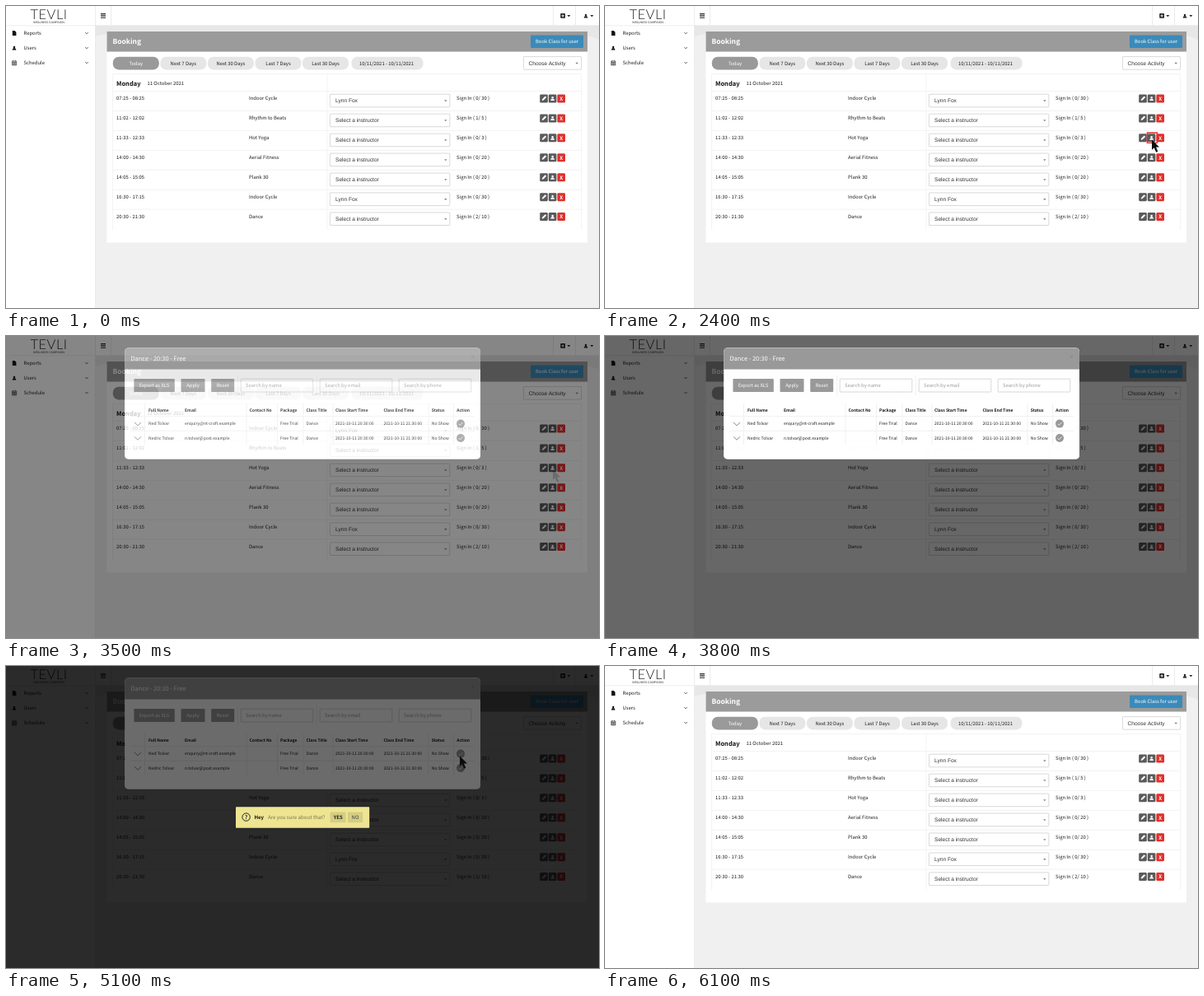
These frames come from a looping animation (720x367 px, 6.6 s). An HTML page:

```html
<!DOCTYPE html>
<html lang="en">
<head>
<meta charset="utf-8">
<title>Class booking</title>
<style>
  html, body { margin: 0; width: 100%; height: 100%; overflow: hidden; background: #f0f0f0; }
  svg { display: block; width: 100%; height: 100%; }
  text {
    font-family: "Noto Sans CJK JP", "Noto Sans CJK SC", "Noto Sans CJK", "Noto Sans", sans-serif;
    font-size: 5.9px; fill: #1c1c1c; text-rendering: geometricPrecision; white-space: pre;
  }
  .form { font-family: "Liberation Sans", Arial, sans-serif; font-size: 6.6px; fill: #333; }
  .logo { font-family: Lato, sans-serif; }
  .small { font-size: 5.05px; }
</style>
</head>
<body>
<svg id="stage" viewBox="0 0 720 367" preserveAspectRatio="none"></svg>
<script>
const LOOP = 6600, STEP = 100;
const GREY = '#999', RED = '#e0302c';

const rect = (x, y, w, h, fill, extra = '') =>
  `<rect x="${x}" y="${y}" width="${w}" height="${h}" fill="${fill}" ${extra}/>`;
const path = (d, stroke, width = 1, fill = 'none') =>
  `<path d="${d}" fill="${fill}" stroke="${stroke}" stroke-width="${width}"/>`;
const text = (x, y, s, extra = '') => `<text x="${x}" y="${y}" ${extra}>${s}</text>`;
const style = (size, fill = '#222', weight = 400) =>
  `style="font-size:${size}px;fill:${fill};font-weight:${weight}"`;
const centred = fill => `text-anchor="middle" style="fill:${fill}"`;
const at = (x, y, s) => `<g transform="translate(${x} ${y})">${s}</g>`;
const field = (x, y, w, h) => rect(x, y, w, h, '#fff', 'stroke="#d0d0d0" stroke-width=".8" rx=".5"');
const caret = (x, y, s, fill) => path(`M${x - s} ${y - s / 2}h${2 * s}l${-s} ${s * 1.2}z`, 'none', 0, fill);
const person = fill =>
  `<circle cy="-1.1" r="1.25" fill="${fill}"/>` + path('M-2.4 2.6q0-2.5 2.4-2.5t2.4 2.5z', 'none', 0, fill);

function chrome() {
  let s = rect(0, 0, 720, 367, '#f0f0f0') +
    path('M108 24H720V41Q700 31 660 31H170Q130 31 108 37z', 'none', 0, '#e7e7e7') +
    rect(0, 0, 108.5, 367, '#fff') + rect(0, 0, 720, 23.5, '#fff') +
    path('M0 23.8H720', '#e6e6e6', .7) +
    path('M108.5 0V367M127.5 0V23.5M664.5 0V23.5M691.5 0V23.5', '#e8e8e8', .8);
  s += text(52, 16, 'TEVLI', 'class="logo" text-anchor="middle" letter-spacing=".5" ' + style(16.5, '#222', 300)) +
    text(52, 20.6, 'WELLNESS CAMPAIGN', 'class="logo" text-anchor="middle" ' + style(3.6, '#333'));
  s += path('M115 9.6h6M115 11.9h6M115 14.2h6', '#222', 1.1);
  s += rect(673.2, 9, 5.8, 5.8, '#222', 'rx=".8"') + path('M676.1 10.2v3.4M674.4 11.9h3.4', '#fff', .9) +
    caret(683.3, 11.9, 2, '#222') + at(704, 12, person('#222')) + caret(711.3, 11.9, 2, '#222');
  ['Reports', 'Users', 'Schedule'].forEach((name, i) => {
    const y = 33 + 18 * i;
    s += text(21.5, y + 2, name) + path(`M96.3 ${y - .9}l1.7 1.7 1.7-1.7`, '#333', .8);
  });
  s += path('M7.8 30h2.8l1.8 1.8v4.2h-4.6z', 'none', 0, '#111') + at(10, 51, person('#111')) +
    path('M7.5 67h5.2v5h-5.2zM7.5 68.4h5.2M8.8 65.8v1.6M11.4 65.8v1.6M7.5 70.2h5.2M9.3 68v4M11 68v4', '#222', .6);
  return s;
}

function bookingRow(i, time, name, coach, signed) {
  const y = 112.1 + 23.93 * i, sy = 107.2 + 23.95 * i;
  let s = text(134, y + 2.1, time) + text(295, y + 2.1, name) + text(547, y + 2.1, `Sign In ( ${signed} )`);
  s += field(393.4, sy, 145.4, 15.6) + text(400, sy + 10.2, coach, 'class="form"') +
    caret(533.8, sy + 8, 1.7, '#888');
  [['#5a5a5a', 653], ['#5a5a5a', 663.6], [RED, 674.2]].forEach(([c, x]) =>
    s += rect(x - 4.8, y - 4.6, 9.6, 10, c, 'rx="1.3"'));
  s += path(`M651 ${y + 2.6}l.5-1.7 3.2-3.2 1.2 1.2-3.2 3.2z`, '#fff', .5, '#fff') +
    at(663.6, y + .3, person('#fff')) +
    text(674.2, y + 2.8, 'X', 'text-anchor="middle" ' + style(6.2, '#fff', 700));
  return s;
}

function booking() {
  let s = rect(122.5, 31, 583.5, 256.5, '#fff') + rect(122.5, 31, 583.5, 24.5, '#9b9b9b') +
    text(129.5, 46.3, 'Booking', style(8.45, '#fff', 700)) +
    rect(637, 35.4, 64, 15.6, '#3a8bba', 'rx="1"') + text(669, 45.2, 'Book Class for user', centred('#fff'));
  ['Today', 'Next 7 Days', 'Next 30 Days', 'Last 7 Days', 'Last 30 Days'].forEach((name, i) => {
    const x = 129.8 + 57.55 * i;
    s += rect(x, 61.8, 56, 15.6, i ? '#e6e6e6' : GREY, 'rx="7"') +
      text(x + 28, 71.7, name, centred(i ? '#222' : '#fff'));
  });
  s += rect(419.5, 61.8, 87, 15.6, '#e6e6e6', 'rx="7"') + text(462, 71.7, '10/11/2021 - 10/11/2021', centred('#222'));
  s += field(628.4, 61.6, 70.2, 15.6) + text(634.5, 71.8, 'Choose Activity', 'class="form"') + caret(693.2, 69.6, 1.7, '#777');
  let grid = 'M129.5 82.5H698.5M129.5 82.5V272M390 82.5V272M698.5 82.5V272';
  for (let i = 0; i < 7; i++) grid += `M129.5 ${103.5 + 23.95 * i}H698.5`;
  s += path(grid, '#f0f0f0', .8);
  s += text(134, 96.6, 'Monday', style(7.5, '#111', 700)) + text(171.5, 96.3, '11 October 2021');
  const none = 'Select a instructor', coach = 'Lynn Fox';
  [
    ['07:25 - 08:25', 'Indoor Cycle', coach, '0/ 30'],
    ['11:02 - 12:02', 'Rhythm to Beats', none, '1/ 5'],
    ['11:33 - 12:33', 'Hot Yoga', none, '0/ 3'],
    ['14:00 - 14:30', 'Aerial Fitness', none, '0/ 20'],
    ['14:05 - 15:05', 'Plank 30', none, '0/ 20'],
    ['16:30 - 17:15', 'Indoor Cycle', coach, '0/ 30'],
    ['20:30 - 21:30', 'Dance', none, '2/ 10']
  ].forEach((row, i) => s += bookingRow(i, ...row));
  return s;
}

const MODAL = 'M149.2 14.5H571q5 0 5 5V144.5q0 5-5 5H149.2q-5 0-5-5V19.5q0-5 5-5z';

function modal() {
  let s = path(MODAL, 'none', 0, '#fff') +
    path('M144.2 40.5V19.5q0-5 5-5H571q5 0 5 5V40.5z', 'none', 0, GREY) +
    text(151.5, 30, 'Dance - 20:30 - Free', style(7.45, '#fff', 500)) +
    text(566.5, 27, '×', 'text-anchor="middle" ' + style(5, '#777'));
  [['Export as XLS', 155.4, 49.4], ['Apply', 212.5, 29], ['Reset', 249.2, 28]].forEach(([name, x, w]) =>
    s += rect(x, 52, w, 16, GREY, 'rx=".8"') + text(x + w / 2, 62, name, centred('#fff')));
  ['name', 'email', 'phone'].forEach((name, i) => {
    const x = 285.2 + 96 * i;
    s += field(x, 52.2, 87.6, 15.8) + text(x + 5.8, 62, 'Search by ' + name, style(5.9, '#999'));
  });
  s += path('M281.5 48V72M377.3 48V72', '#eee', .8) +
    path('M168.5 82V132M292 82V132M329.5 82V132M361 82V132M397 82V132M513 82V132M543.5 82V132M151 97.6H569M151 115.3H569', '#ececec', .8);
  const cols = [173, 217, 295.5, 333, 364.5, 400, 458.5, 516.8, 547.3];
  ['Full Name', 'Email', 'Contact No', 'Package', 'Class Title', 'Class Start Time', 'Class End Time', 'Status', 'Action']
    .forEach((name, i) => s += text(cols[i], 91.7, name, style(5, '#111', 700)));
  [['Ned Tolvar', 'enquiry@nt-craft.example'], ['Nedric Tolvar', 'n.tolvar@post.example']].forEach((who, r) => {
    const y = 106.6 + 17.4 * r;
    [...who, '', 'Free Trial', 'Dance', '2021-10-11 20:30:00', '2021-10-11 21:30:00', 'No Show']
      .forEach((cell, i) => s += text(cols[i], y + 1.8, cell, 'class="small"'));
    s += path(`M156 ${y - 1.7}l4 4 4-4`, '#777', .9) +
      `<circle cx="552" cy="${y}" r="5" fill="${GREY}"/>` + path(`M549.6 ${y + .2}l1.7 1.7 3.2-3.5`, '#fff', .8);
  });
  return s;
}

function toast() {
  return rect(279, 171.2, 162.2, 25.6, '#eee592', 'rx=".8"') +
    '<circle cx="291.6" cy="183.6" r="4.7" fill="none" stroke="#222" stroke-width="1"/>' +
    text(291.6, 186, '?', 'text-anchor="middle" ' + style(6.4, '#222', 700)) +
    text(301.5, 185.5, 'Hey', style(6.05, '#111', 700)) +
    text(318, 185.5, 'Are you sure about that?', style(6.15, '#77724a')) +
    rect(393.6, 177.4, 19, 12.8, '#d5cd83', 'rx=".8"') + rect(415, 177.4, 18.2, 12.8, '#d5cd83', 'rx=".8"') +
    text(403.2, 185.8, 'YES', 'text-anchor="middle" ' + style(6, '#222', 700)) +
    text(424, 185.8, 'NO', 'text-anchor="middle" ' + style(6, '#444'));
}

// The dimming leaves the dialog's own area clear, so the dialog fades in over a bright page.
const stage = document.getElementById('stage');
stage.innerHTML = chrome() + booking() +
  '<path id="mark" d="M658.4 154H670.4V166.4H658.4z" fill="none" stroke="#e0302c" stroke-width="1.4" pathLength="1"/>' +
  `<path id="dim" d="M0 0H720V367H0z${MODAL}" fill-rule="evenodd"/>` + `<g id="modal">${modal()}</g>` +
  `<g id="confirm">${rect(0, 0, 720, 367, '#000', 'opacity=".58"')}${toast()}</g>` +
  '<circle id="ripple" fill="none" stroke="#777" stroke-width="1"/>' +
  '<path id="cursor" d="M0 0V12.2L2.8 9.7 5.1 15.2 7.3 14.2 5 8.9H9z" fill="#0c0c0c"/>';

const part = id => document.getElementById(id);
const mark = part('mark'), dim = part('dim'), modalBox = part('modal'),
  confirmBox = part('confirm'), ripple = part('ripple'), cursor = part('cursor');

const span = (t, from, to) => Math.min(1, Math.max(0, (t - from) / (to - from)));
const easeOut = p => 1 - (1 - p) ** 2;
const easeInOut = p => p < .5 ? 8 * p ** 4 : 1 - 8 * (1 - p) ** 4;
const mix = (a, b, p) => a.map((v, i) => v + (b[i] - v) * p);
const show = (el, opacity) => {
  el.setAttribute('opacity', opacity);
  el.style.display = opacity > 0 ? '' : 'none';
};

function cursorAt(t) {
  if (t < 4200) return mix([356, 175.5], [664, 162.5], easeOut(span(t, 600, 700)));
  if (t < 5300) return mix([375, 109.5], [551, 109.5], easeOut(span(t, 4200, 4400)));
  return [403, 184];
}

function draw(t) {
  const fade = easeInOut(span(t, 2790, 3980));
  const leave = 1 - span(t, 5900, 6100);

  const drawn = span(t, 900, 2400);
  mark.setAttribute('stroke-dasharray', `${drawn} 2`);
  show(mark, drawn ? 1 - span(t, 2400, 2600) : 0);

  show(dim, .6 * fade * leave);
  show(modalBox, fade * leave);
  show(confirmBox, t >= 5100 ? leave : 0);

  const [x, y] = cursorAt(t);
  cursor.setAttribute('transform', `translate(${x} ${y})`);
  show(cursor, t < 600 ? 0 : t < 4200 ? 1 - fade : leave);

  const start = t < 5300 ? 4600 : 5500, age = t - start;
  ripple.setAttribute('cx', x + 1.5);
  ripple.setAttribute('cy', y + 1.8);
  ripple.setAttribute('r', 2.5 + 4 * span(age, 0, 200));
  show(ripple, age >= 0 && age < 300 ? .8 - age / 500 : 0);
}

const begin = performance.now();
function tick() {
  const t = (performance.now() - begin) % LOOP;
  draw(Math.floor(t / STEP) * STEP);
  requestAnimationFrame(tick);
}
tick();
</script>
</body>
</html>
```
